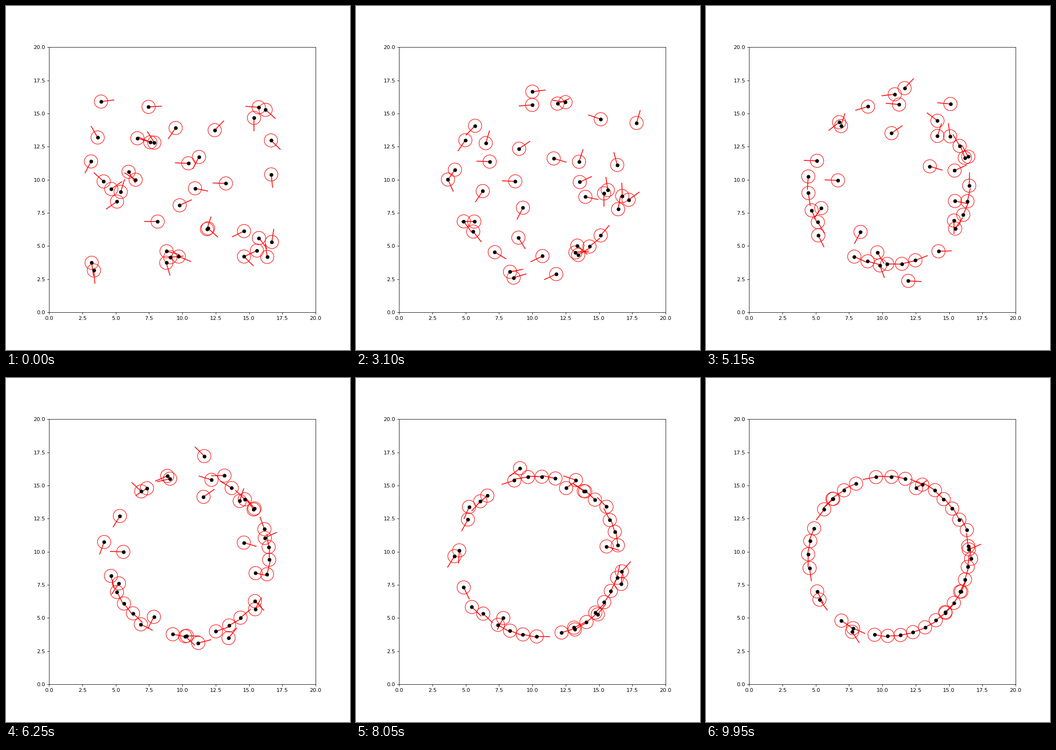
A matplotlib script that plays this animation: 720x720 px, repeating every 10000 ms.

```python
import numpy as np
import matplotlib.pyplot as plt
from matplotlib.animation import FuncAnimation
from matplotlib.collections import EllipseCollection, LineCollection

FRAMES, STEP_MS = 200, 50
CENTRE, RADIUS = np.array([10.5, 9.65]), 5.85
FAST, SLOW, CREEP = 0.1, 0.05, 0.015
MAX_TURN = 4

# Starting x, y and heading in degrees of every robot.
START = np.reshape([
    3.9, 15.9, 7, 7.47, 15.5, 3, 12.43, 13.74, 46, 16.25, 15.28, -42,
    16.65, 12.97, -44, 15.73, 15.47, 176, 4.67, 9.3, 35, 7.9, 12.8, 122,
    7.6, 12.83, 156, 5.38, 9.08, 73, 10.45, 11.24, 178, 6.5, 10.0, 148,
    6.63, 13.13, -17, 11.85, 6.27, 72, 16.72, 5.3, 82, 16.37, 4.17, 98,
    9.8, 8.07, 25, 10.95, 9.35, -12, 15.38, 14.67, -90, 13.27, 9.72, 178,
    9.5, 13.91, -124, 3.65, 13.19, 120, 4.1, 9.87, 138, 8.15, 6.84, 180,
    3.15, 11.38, 243, 5.1, 8.35, 215, 11.25, 11.72, -117, 5.97, 10.6, -59,
    3.2, 3.73, -82, 3.37, 3.15, -86, 14.63, 6.12, 206, 15.6, 4.65, 205,
    8.82, 4.6, -15, 9.1, 4.15, 5, 8.8, 3.73, -74, 9.73, 4.2, -22,
    11.93, 6.33, -42, 16.67, 10.4, -84, 15.75, 5.6, -53, 14.63, 4.2, -45],
    (-1, 3))


def wrap(degrees):
    return (degrees + 180) % 360 - 180


def along(degrees):
    a = np.radians(degrees)
    return np.column_stack([np.cos(a), np.sin(a)])


def angle(v):
    return np.degrees(np.arctan2(v[..., 1], v[..., 0]))


def blocked(pos, heading):
    """Whether another robot is close in front of each robot."""
    gap = pos[None] - pos[:, None]
    dist = np.hypot(gap[..., 0], gap[..., 1])
    off = np.abs(wrap(angle(gap) - heading[:, None]))
    return ((dist > 0) & (dist < 1) & (off < 40)).any(axis=1)


def advance(pos, heading):
    rel = pos - CENTRE
    r = np.hypot(rel[:, 0], rel[:, 1])
    lean = wrap(heading - angle(rel))  # 0 is outward, 90 circles to the left

    # Outside the ring, turn left to the tangent or a little inward of it.
    goal = 90 + np.clip(25 * (r - RADIUS), 0, 35)
    turning = (r > RADIUS) & (lean > -75) & (lean < goal)
    error = np.where(turning, goal - lean, 0)

    speed = np.where((lean > -88) & (lean < 55), SLOW, FAST)
    curve = FAST * np.cos(np.radians(error))
    speed = np.where(turning, np.maximum(curve, CREEP), speed)

    # Queue on the ring; wait inside it until there is room to join.
    near = blocked(pos, heading) & (r > 4.5)
    speed = np.where(near, np.minimum(speed, SLOW), speed)
    speed[near & (r < RADIUS) & (np.abs(lean) < 60)] = 0

    heading = heading + np.minimum(0.2 * error, MAX_TURN)
    return pos + speed[:, None] * along(heading), heading


def simulate():
    states = [(START[:, :2], START[:, 2])]
    while len(states) < FRAMES:
        states.append(advance(*states[-1]))
    return states


states = simulate()

fig, ax = plt.subplots(figsize=(9, 9), dpi=80)
ax.set_xlim(0, 20)
ax.set_ylim(0, 20)

ones = np.ones(len(START))
bodies = EllipseCollection(ones, ones, 0 * ones, units="xy",
                           offsets=START[:, :2],
                           offset_transform=ax.transData,
                           facecolors="none", edgecolors="red", linewidths=1)
sights = LineCollection([], colors="red", linewidths=1.5, zorder=2)
ax.add_collection(bodies, autolim=False)
ax.add_collection(sights, autolim=False)
dots, = ax.plot([], [], "ko", zorder=3)


def draw(frame):
    pos, heading = states[frame]
    bodies.set_offsets(pos)
    sights.set_segments(np.stack([pos, pos + along(heading)], axis=1))
    dots.set_data(pos[:, 0], pos[:, 1])
    return bodies, sights, dots


anim = FuncAnimation(fig, draw, frames=FRAMES, interval=STEP_MS,
                     repeat=True, repeat_delay=0)
plt.show()
```
